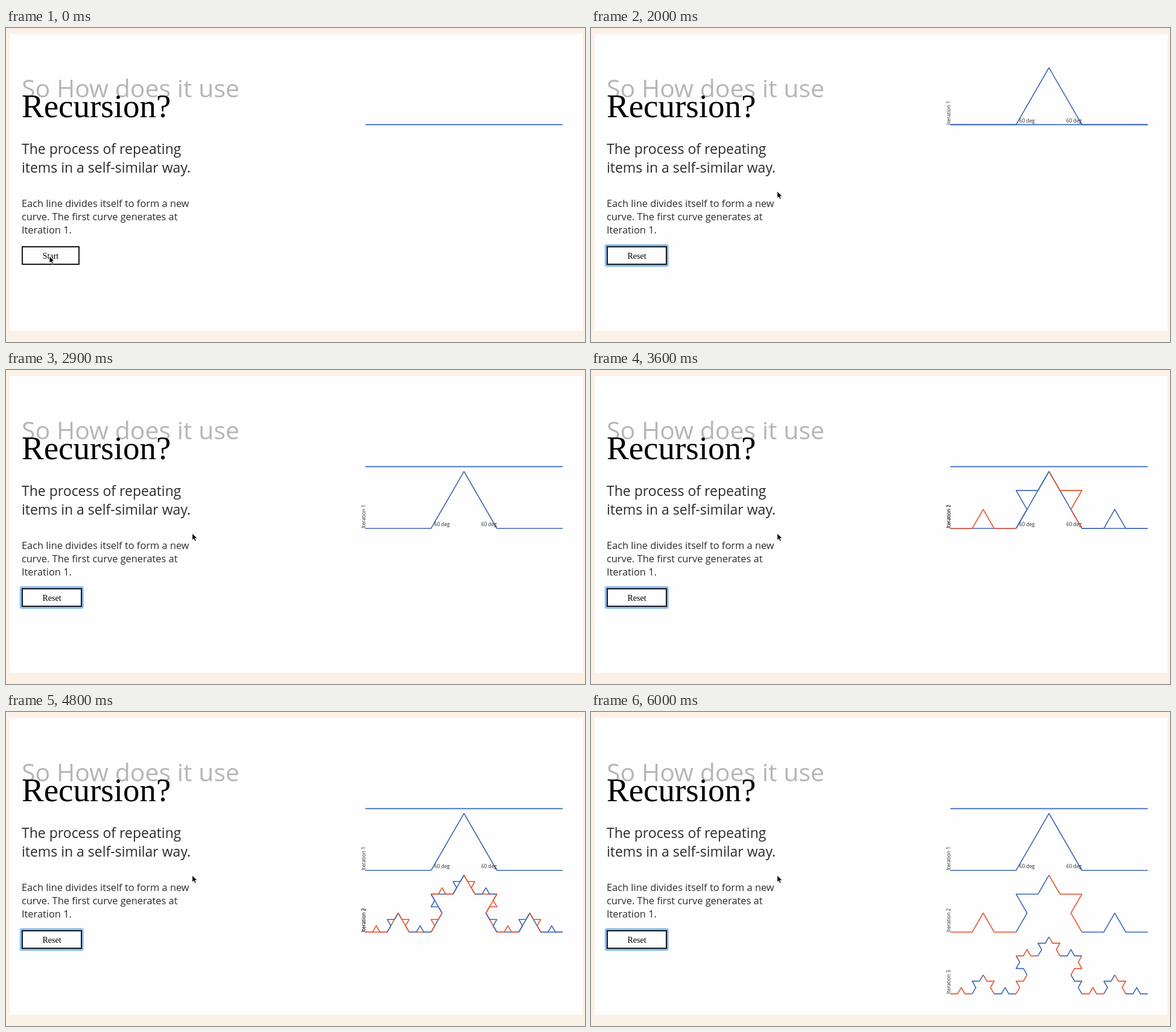
Animation of 960x521 px, one loop 6100 ms. Source, as an HTML page:

```html
<!DOCTYPE html>
<html lang="en">
<head>
<meta charset="utf-8">
<title>Recursion</title>
<style>
  html, body { margin: 0; width: 100%; height: 100%; overflow: hidden; background: #fcf1e6; }
  svg { display: block; width: 960px; height: 521px; font-family: "Open Sans", sans-serif; fill: #2b2b2b; }
  .serif { font-family: "Liberation Serif", serif; fill: #000; }
  .small { font-size: 8.25px; }
  .curve { fill: none; stroke-width: 1.6; stroke-linejoin: round; }
</style>
</head>
<body>
<svg viewBox="0 0 960 521">
  <rect x="6" y="10" width="950" height="492.5" fill="#fefefe"/>
  <text x="26" y="115" font-size="41" fill="#b6b6b6">So How does it use</text>
  <text class="serif" x="26" y="148" font-size="55">Recursion?</text>
  <g font-size="23">
    <text x="26" y="209">The process of repeating</text>
    <text x="26" y="240">items in a self-similar way.</text>
  </g>
  <g font-size="16.4">
    <text x="26" y="297">Each line divides itself to form a new</text>
    <text x="26" y="319">curve. The first curve generates at</text>
    <text x="26" y="341">Iteration 1.</text>
  </g>
  <rect id="ring" x="24.5" y="360.5" height="34" rx="2" fill="none" stroke="#86baf3" stroke-width="3.4"/>
  <rect id="button" x="27" y="363" height="29" fill="#fefefe" stroke="#000" stroke-width="1.8"/>
  <text id="caption" class="serif" y="382.5" font-size="14" text-anchor="middle"></text>
  <path class="curve" d="M595.7 160.4H923" stroke="#3568c2"/>
  <g id="curves"></g>
  <path id="cursor" d="M0 0V11.2L2.6 8.8L4.4 13L6.4 12.1L4.6 8H8.2Z" fill="#000" stroke="#fff" stroke-width=".8"/>
</svg>
<script>
const LOOP = 6100, LEFT = 595.7, WIDTH = 327.3, TOP = 160.4, GAP = 102.4;
const BLUE = '#3b65af', RED = '#e2512f';
const $ = id => document.getElementById(id);
const iterations = [
  { show: 1880, move: 2364 },
  { show: 3100, move: 3583 },
  { show: 4380, move: 4862 }
];

// The four segment ends that follow point a on the way to b.
function split([ax, ay], [bx, by]) {
  const dx = (bx - ax) / 3, dy = (by - ay) / 3, s = Math.sqrt(3) / 2;
  return [
    [ax + dx, ay + dy],
    [ax + dx * 1.5 + dy * s, ay + dy * 1.5 - dx * s],
    [ax + dx * 2, ay + dy * 2],
    [bx, by]
  ];
}

function koch(depth) {
  let points = [[LEFT, 0], [LEFT + WIDTH, 0]];
  while (depth--) points = points.flatMap((p, i) => i ? split(points[i - 1], p) : [p]);
  return points;
}

function curveMarkup(level) {
  const points = koch(level);
  let markup = '';
  for (let i = 0; i + 4 < points.length; i += 4) {
    const color = level > 1 && i % 8 === 0 ? RED : BLUE;
    markup += `<polyline class="curve" stroke="${color}" points="${points.slice(i, i + 5).join(' ')}"/>`;
  }
  if (level === 1) {
    markup += '<text class="small" x="710" y="-3.8">60 deg</text><text class="small" x="788" y="-3.8">60 deg</text>';
  }
  return markup + `<text class="small" transform="translate(595.5 0) rotate(-90)">Iteration ${level}</text>`;
}

iterations.forEach((it, i) => {
  it.node = document.createElementNS('http://www.w3.org/2000/svg', 'g');
  it.node.innerHTML = curveMarkup(i + 1);
  $('curves').append(it.node);
});

const visible = (node, on) => node.setAttribute('visibility', on ? 'visible' : 'hidden');

function ease(t, start, duration) {
  const k = Math.min(1, Math.max(0, (t - start) / duration));
  return k < .5 ? 4 * k ** 3 : 1 - 4 * (1 - k) ** 3;
}

function draw() {
  const t = performance.now() % LOOP;
  const reset = t >= 700, width = reset ? 98 : 94;
  $('button').setAttribute('width', width);
  $('ring').setAttribute('width', width + 4.5);
  visible($('ring'), t >= 600);
  $('caption').textContent = reset ? 'Reset' : 'Start';
  $('caption').setAttribute('x', 27 + width / 2);

  const k = ease(t, 1500, 200);
  $('cursor').setAttribute('transform', `translate(${72 + 236.8 * k} ${378.8 - 107.6 * k})`);

  iterations.forEach(({ node, show, move }, i) => {
    visible(node, t >= show);
    node.setAttribute('transform', `translate(0 ${TOP + GAP * (i + ease(t, move, 500))})`);
  });
  requestAnimationFrame(draw);
}
draw();
</script>
</body>
</html>
```
